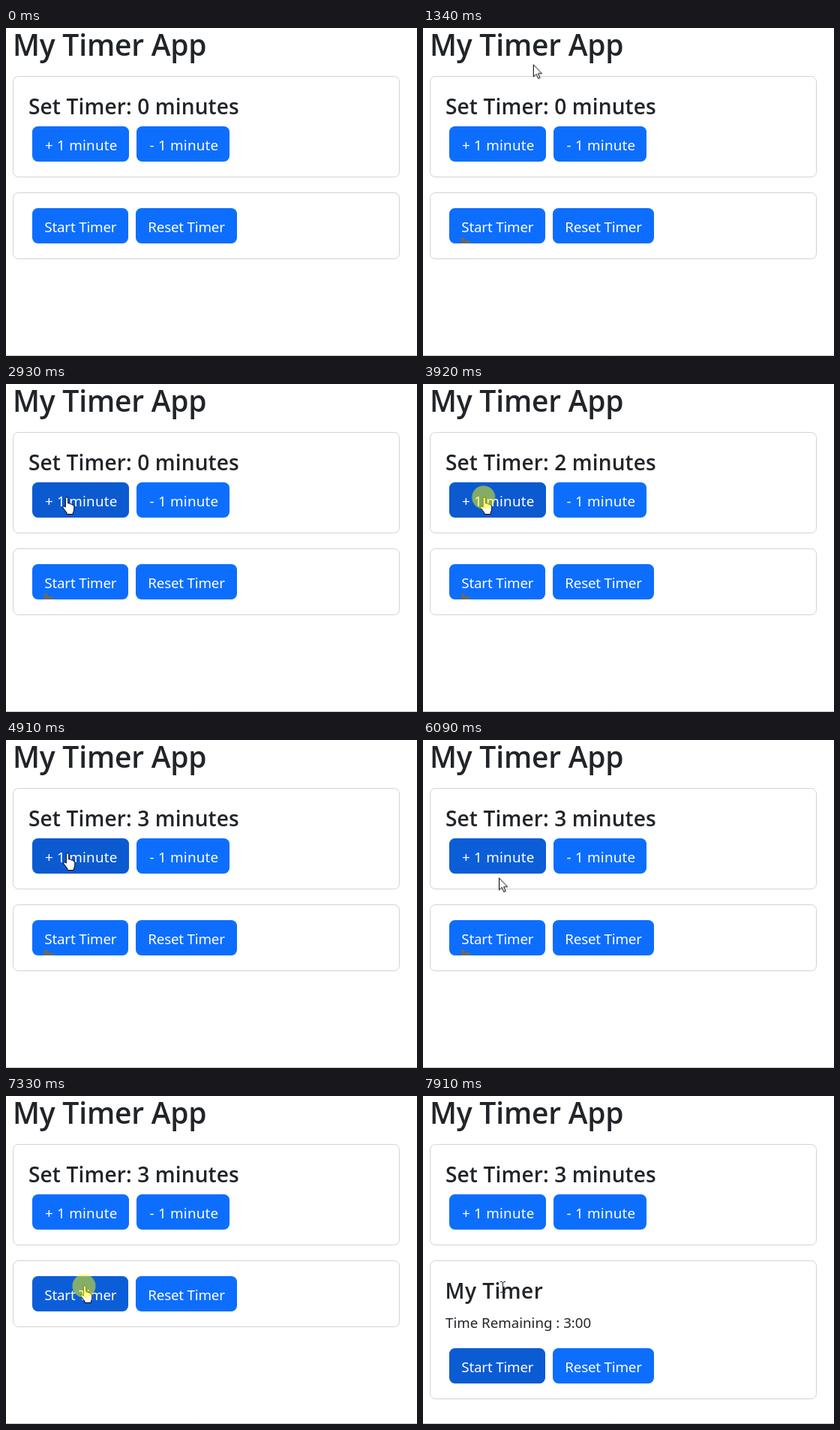
These frames come from a looping animation (548 px wide and 437 px high, 8 s). An HTML page:

```html
<!DOCTYPE html>
<html lang="en">
<head>
<meta charset="utf-8">
<title>Timer</title>
<style>
  html, body { margin: 0; width: 100%; height: 100%; overflow: hidden; background: #fff; }
  svg { display: block; width: 548px; height: 437px; }
  text { fill: #212529; font-family: "Noto Sans", "Open Sans", sans-serif; font-size: 18.7px; }
  .title, .heading { font-family: "Open Sans", "Noto Sans", sans-serif; font-weight: 600; }
  .title { font-size: 39px; letter-spacing: -.22px; }
  .heading { font-size: 28.1px; letter-spacing: .12px; }
  .wide { letter-spacing: .45px; }
  .card { fill: #fff; stroke: #d2d2d2; }
  .button { fill: #0d6efd; }
  .label { fill: #fff; font-size: 18.8px; letter-spacing: .24px; }
  .tight { letter-spacing: -.2px; }

  /* Everything shares one 8 s clock: 1% = 80 ms */
  .anim { animation: 8s linear infinite; }
  .step { animation: 8s step-end infinite; }

  #pointer { animation-name: move; }
  @keyframes move {
    0%, 4% { transform: translate(392px, 428px); }
    8.5% { transform: translate(-14px, 236px); }
    8.51%, 12% { transform: translate(140px, -20px); }
    16.75% { transform: translate(147px, 48px); animation-timing-function: ease-out; }
    22.25% { transform: translate(88px, 150px); }
    26% { transform: translate(84px, 157px); }
    31.4%, 42% { transform: translate(81px, 151px); }
    52%, 69% { transform: translate(82px, 151px); }
    76.1% { transform: translate(101px, 183px); }
    79.1% { transform: translate(103px, 212px); }
    83.2% { transform: translate(104px, 240px); animation-timing-function: ease-out; }
    90%, 93.1% { transform: translate(105px, 253px); }
    95%, 100% { transform: translate(106px, 254px); }
  }
  #arrow { animation-name: arrow; }
  @keyframes arrow {
    0% { opacity: 0; } 4% { opacity: 1; } 22.4% { opacity: 0; }
    75% { opacity: 1; } 83.2%, 100% { opacity: 0; }
  }
  #hand { animation-name: hand; }
  @keyframes hand {
    0% { opacity: 0; } 22.4% { opacity: 1; } 75% { opacity: 0; }
    83.2% { opacity: 1; } 93.8%, 100% { opacity: 0; }
  }
  #caret { animation-name: caret; }
  @keyframes caret { 0% { opacity: 0; } 93.8%, 100% { opacity: 1; } }
  #click { animation-name: click; }
  @keyframes click {
    0% { opacity: 0; }
    38.2% { opacity: .5; } 40.6% { opacity: 0; }
    47.2% { opacity: .5; } 49.6% { opacity: 0; }
    56% { opacity: .5; } 58.4% { opacity: 0; }
    91.6% { opacity: .5; } 93.8%, 100% { opacity: 0; }
  }

  #plus { animation-name: plus; }
  @keyframes plus {
    0%, 22.4% { fill: #0d6efd; }
    24.5%, 31.4% { fill: #0b5ed7; }
    33.5%, 64% { fill: #0b5ad0; }
    67%, 76.5% { fill: #0b5ed7; }
    80.5%, 100% { fill: #0d6efd; }
  }
  #start { animation-name: start; }
  @keyframes start {
    0%, 83.2% { fill: #0d6efd; }
    86%, 91.6% { fill: #0b5ed7; }
    93.1%, 100% { fill: #0b5bd2; }
  }
  #smudge { animation-name: smudge; }
  @keyframes smudge { 0% { opacity: 0; } 7.2% { opacity: 1; } 83.2%, 100% { opacity: 0; } }

  #n0 { animation-name: n0; }
  #n1 { animation-name: n1; }
  #n2 { animation-name: n2; }
  #n3 { animation-name: n3; }
  @keyframes n0 { 0% { opacity: 1; } 39.2%, 100% { opacity: 0; } }
  @keyframes n1 { 0% { opacity: 0; } 39.2% { opacity: 1; } 48.2%, 100% { opacity: 0; } }
  @keyframes n2 { 0% { opacity: 0; } 48.2% { opacity: 1; } 57%, 100% { opacity: 0; } }
  @keyframes n3 { 0% { opacity: 0; } 57%, 100% { opacity: 1; } }

  #running { animation-name: running; }
  @keyframes running { 0% { opacity: 0; } 93.1%, 100% { opacity: 1; } }
  #panel { animation-name: grow; }
  @keyframes grow { 0% { height: 88px; } 93.1%, 100% { height: 184px; } }
  #controls { animation-name: drop; }
  @keyframes drop { 0% { transform: none; } 93.1%, 100% { transform: translateY(96px); } }
</style>
</head>
<body>
<svg viewBox="0 0 548 437">
  <text class="title" x="9" y="37">My Timer App</text>

  <rect class="card" x="9.5" y="64.5" width="515" height="134" rx="7"/>
  <text id="n0" class="heading step" x="30" y="115">Set Timer: 0 minutes</text>
  <text id="n1" class="heading step" x="30" y="115">Set Timer: 1 minute</text>
  <text id="n2" class="heading step" x="30" y="115">Set Timer: 2 minutes</text>
  <text id="n3" class="heading step" x="30" y="115">Set Timer: 3 minutes</text>
  <rect id="plus" class="button anim" x="35" y="131" width="129" height="47" rx="7.5"/>
  <text class="label" x="52" y="163">+ 1 minute</text>
  <rect class="button" x="174" y="131" width="124" height="47" rx="7.5"/>
  <text class="label" x="191.5" y="163">- 1 minute</text>

  <rect id="panel" class="card step" x="9.5" y="219.5" width="515" height="88" rx="7"/>
  <g id="running" class="step">
    <text class="heading wide" x="29.5" y="270">My Timer</text>
    <text x="30" y="309">Time Remaining : 3:00</text>
  </g>
  <g id="controls" class="step">
    <rect id="start" class="button anim" x="35" y="240" width="128" height="47" rx="7.5"/>
    <text class="label tight" x="51.3" y="272">Start Timer</text>
    <rect class="button" x="173" y="240" width="135" height="47" rx="7.5"/>
    <text class="label tight" x="189.3" y="272">Reset Timer</text>
    <path id="smudge" class="step" d="M51 279h4l1 4h6l1 2v2H51z" fill="#686868"/>
  </g>

  <path d="M0 436.5H548" stroke="#c8c8c8"/>

  <g id="pointer" class="anim" stroke="#000" fill="#fff" stroke-linejoin="round">
    <path id="arrow" class="step" d="M.5 .5V16.5L4.2 13l2.6 6 2.4-1-2.6-5.8h5z"/>
    <path id="hand" class="step" d="M-1.7 12.5V1.5a1.7 1.7 0 0 1 3.4 0V8q3-.8 3.2 1 2.5-.6 2.7 1.2 2.2-.3 2.2 1.8v4q0 2-1.5 4.5V22.5H0v-2L-5 14q-1-2 1-2.3 1-.1 2.3 1.5z"/>
    <path id="caret" class="step" fill="none" stroke="#222" d="M-3 -6.5h2l1.5 1 1.5-1h2M.5 -6V7M-3 7.5h2l1.5-1 1.5 1h2"/>
    <circle id="click" class="step" cx="-1" r="15.5" fill="#ff0" stroke="none"/>
  </g>
</svg>
</body>
</html>
```
